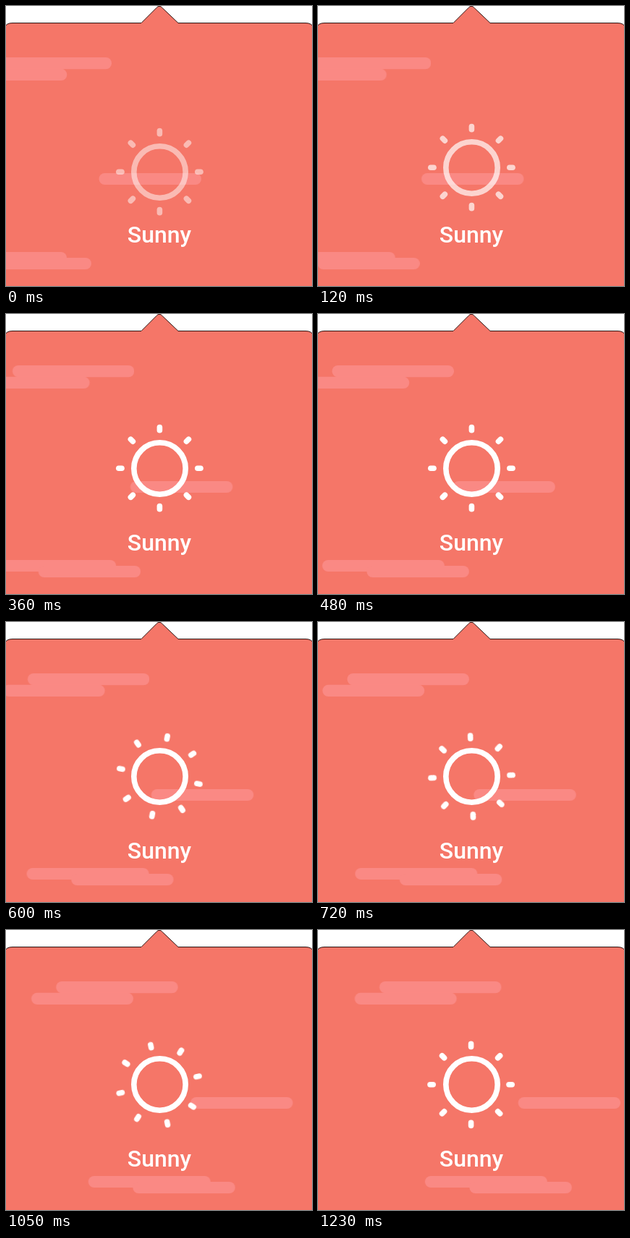
Write an HTML page that moves like this. It is 423x387 px and loops after 1.26 s.

```html
<!DOCTYPE html>
<html lang="en">
<head>
<meta charset="utf-8">
<title>Sunny</title>
<style>
  html, body { margin: 0; width: 100%; height: 100%; overflow: hidden; background: #fff; }
  svg { display: block; width: 423px; height: 387px; }
  .panel { fill: #f57668; stroke: #2a1210; stroke-width: 1; }
  .cloud { fill: #fa8984; animation: drift 1260ms steps(42) infinite; }
  .rays, .ring { fill: none; stroke: #fff; stroke-width: 7.6; stroke-linecap: round; }
  .rays { transform-origin: 212px 213.5px; }
  text { font: 500 32px Roboto, "DejaVu Sans", sans-serif; fill: #fff; text-anchor: middle; }
  @keyframes drift { to { transform: translateX(var(--run)); } }
</style>
</head>
<body>
<svg viewBox="0 0 423 387">
  <path class="panel" d="M-2 30Q0 23.5 9 23.5H187L207.5 3Q212 -2.5 216.5 3L238 23.5H414Q423 23.5 425 30V389H-2Z"/>
  <g class="cloud" style="--run:110px">
    <rect x="-22.5" y="71" width="168.5" height="16.3" rx="8"/>
    <rect x="-56.7" y="86.8" width="141" height="16.2" rx="8"/>
  </g>
  <g class="cloud" style="--run:151.8px">
    <rect x="128.5" y="231" width="141.5" height="16" rx="8"/>
  </g>
  <g class="cloud" style="--run:238.5px">
    <rect x="-85" y="340" width="169" height="16" rx="8"/>
    <rect x="-23.5" y="348" width="141.5" height="16" rx="8"/>
  </g>
  <g class="sun">
    <circle class="ring" cx="212.5" cy="213.5" r="35.7"/>
    <g class="rays"></g>
  </g>
  <text x="212" y="327">Sunny</text>
</svg>
<script>
  const LOOP = 1260, STEP = 30;
  const $ = s => document.querySelector(s);
  const clamp = v => Math.min(1, Math.max(0, v));
  const easeInOut = p => p < .5 ? 2 * p * p : 1 - 2 * (1 - p) ** 2;

  const rays = $('.rays');
  for (let a = 0; a < 360; a += 45) {
    const ray = document.createElementNS('http://www.w3.org/2000/svg', 'path');
    ray.setAttribute('d', 'M0 -52.4V-56.6');
    ray.setAttribute('transform', `translate(212.4 213.2) rotate(${a})`);
    rays.append(ray);
  }

  // Holds each pose for one step of the loop.
  function play(el, pose) {
    const frames = [];
    for (let t = 0; t <= LOOP; t += STEP)
      frames.push({ ...pose(t), offset: t / LOOP, easing: 'steps(1, end)' });
    el.animate(frames, { duration: LOOP, iterations: Infinity });
  }

  play($('.sun'), t => {
    const p = clamp(t / 320);
    return { transform: `translateY(${16 * (1 - p)}px)`, opacity: .5 + .5 * p };
  });
  play(rays, t => ({ transform: `rotate(${180 * easeInOut(clamp((t - 478) / 700))}deg)` }));
</script>
</body>
</html>
```
